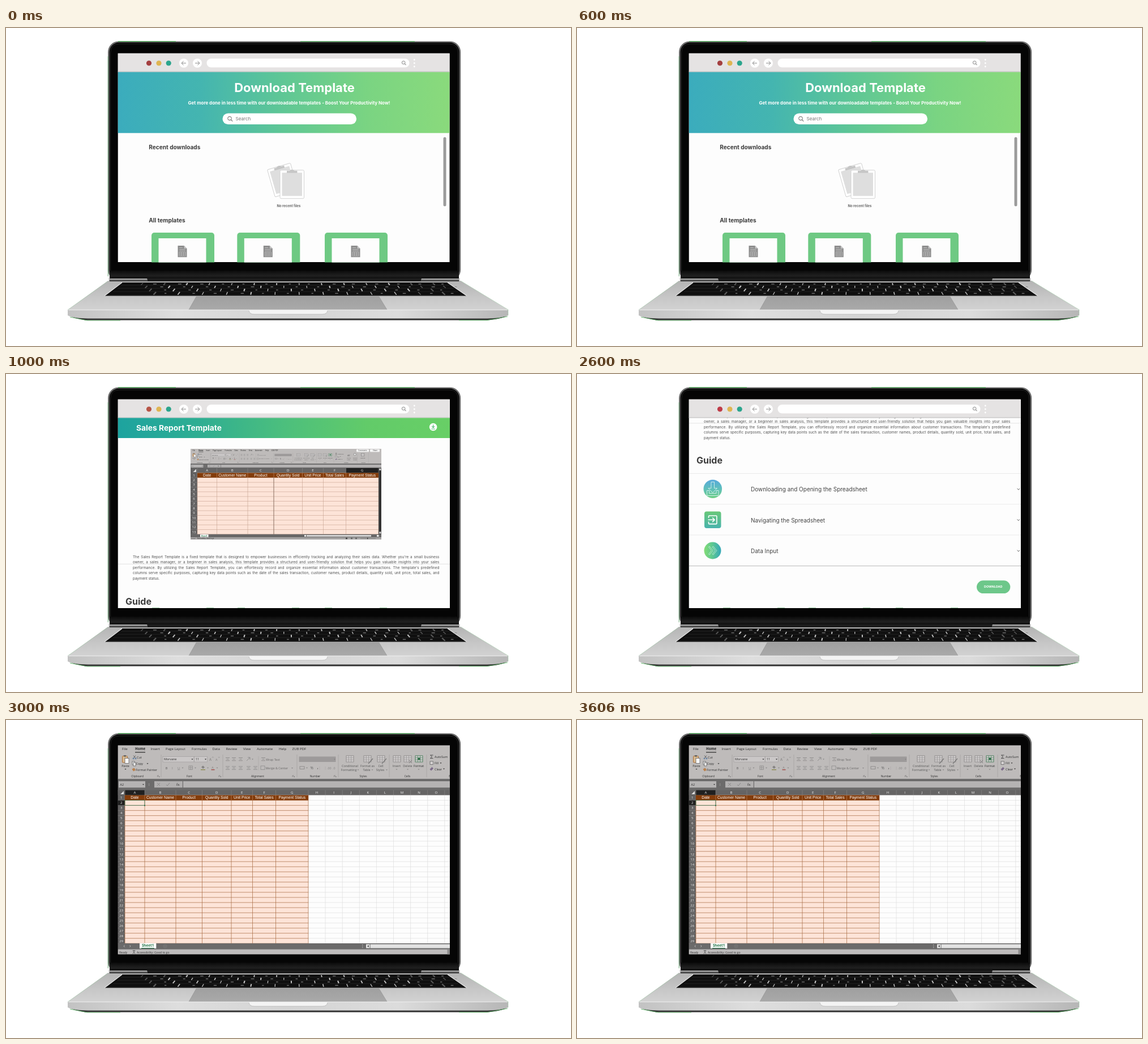
Recreate the animation shown at these times as an HTML page. Size 998 px wide and 561 px high, loop 4010 ms.

```html
<!DOCTYPE html>
<html lang="en">
<head>
<meta charset="utf-8">
<title>Template download</title>
<style>
html, body { margin: 0; width: 100%; height: 100%; overflow: hidden; background: #fff; }
svg { display: block; width: 100%; height: 100%; }
.para { font: 6.3px/9.65px Inter, sans-serif; color: #505050; }
.para div { text-align: justify; text-align-last: justify; height: 9.65px; }
.para div:last-child { text-align-last: left; }
</style>
</head>
<body>
<svg id="stage" viewBox="0 0 998 561" xmlns="http://www.w3.org/2000/svg"></svg>
<script>
const LOOP = 4010, STEP = 1000;
const INTER = 'Inter, sans-serif', UI = 'Open Sans, sans-serif', ARIAL = 'Liberation Sans, Arial, sans-serif';

// Drawing helpers: each returns a piece of SVG markup
const rect = (x, y, w, h, fill, rx = 0, more = '') =>
  `<rect x="${x}" y="${y}" width="${w}" height="${h}" rx="${rx}" fill="${fill}" ${more}/>`;
const circle = (x, y, r, fill, more = '') => `<circle cx="${x}" cy="${y}" r="${r}" fill="${fill}" ${more}/>`;
const shape = (d, fill, more = '') => `<path d="${d}" fill="${fill}" ${more}/>`;
const line = (d, color, w = 1, more = '') =>
  `<path d="${d}" fill="none" stroke="${color}" stroke-width="${w}" ${more}/>`;
const text = (x, y, s, size, fill, o = {}) =>
  `<text x="${x}" y="${y}" font-size="${size}" fill="${fill}" font-family="${o.font || INTER}"
    font-weight="${o.weight || 400}" text-anchor="${o.anchor || 'start'}">${s.replace(/&/g, '&amp;')}</text>`;
const group = (inner, more) => `<g ${more}>${inner}</g>`;
const range = (n, f) => Array.from({ length: n }, (_, i) => f(i)).join('');
const gradient = (id, colors, vertical) =>
  `<linearGradient id="${id}" x2="${vertical ? 0 : 1}" y2="${vertical ? 1 : 0}">${colors.map((c, i) =>
    `<stop offset="${i / (colors.length - 1)}" stop-color="${c}"/>`).join('')}</linearGradient>`;
const clip = (id, x, y, w, h) => `<clipPath id="${id}">${rect(x, y, w, h, '#000')}</clipPath>`;

function random(seed) {
  return () => (seed = (seed * 16807) % 2147483647) / 2147483647;
}

const defs = `<defs>
  ${gradient('hero', ['#3bacbd', '#44b5b0', '#5fc795', '#7ad482', '#8ada7c'])}
  ${gradient('band', ['#1da39f', '#2fae92', '#4cbf7d', '#62cb69', '#68cf66'])}
  ${gradient('chin', ['#0a0a0a', '#161616', '#202020', '#0c0c0c'], true)}
  ${gradient('deck', ['#b4b4b4', '#c6c6c6', '#d4d4d4'], true)}
  ${gradient('lip', ['#c2c2c2', '#dedede', '#d4d4d4', '#dcdcdc', '#b6b6b6'])}
  ${gradient('pad', ['#a0a0a0', '#a9a9a9'], true)}
  ${gradient('icon0', ['#58a9dc', '#5fc0bb', '#6fcf84'], true)}
  ${gradient('icon1', ['#69c878', '#48b3ad'], true)}
  ${gradient('icon2', ['#84dc76', '#5cc792', '#35a8b8'])}
  ${clip('screen', 197.5, 44.5, 586.5, 369)}
  ${clip('page', 197.5, 77.5, 586.5, 335.5)}
  ${clip('shot', 326, 132, 337, 160)}
</defs>`;

function keyboard() {
  const rnd = random(41);
  const half = y => 290 + (y - 449) * 1.28;
  let out = shape('M205 449H780L814 472.5H174Z', '#0f0f0f') +
    line('M174 472.5L205 449M780 449L814 472.5', '#e6e6e6', 1.2);
  [[450, 453.4], [454.8, 458.6], [460, 464.4], [465.8, 470.6]].forEach(([a, b], r) => {
    out += line(`M${494 - half(b) + 5} ${b + .6}H${494 + half(b) - 5}`, '#363636', .5);
    for (let i = 1; i < 15; i++) {
      const u = (i + r * .32) / 7.4 - 1;
      if (u > .96) continue;
      const x = 494 + u * half(a), x2 = 494 + u * half(b);
      out += line(`M${x} ${a}L${x2} ${b}`, Math.abs(u) < .72 ? '#c4c4c4' : '#5c5c5c', 1.2 + rnd());
      out += rect(x + 14 + rnd() * 10, (a + b) / 2 - .6, 3 + rnd() * 3, 1.1, '#8a8a8a');
    }
  });
  return out;
}

function laptop() {
  return rect(180, 23.4, 623.2, 422, '#6c6c6c', 19) +
    rect(182.6, 25.6, 618, 419, '#050505', 17) +
    line('M184.5 430V44Q184.5 28 200 28H783Q798.5 28 798.5 44V430', '#242424', 1) +
    rect(183, 428, 617, 14, 'url(#chin)') +
    line('M180.3 50V438', '#3f8a4d', .8) + line('M198 23.6H300M520 23.8H722', '#2fb23f', .9) +
    shape('M180 446H803L887 497V502H109V497Z', 'url(#deck)') +
    rect(183, 441.5, 617, 5.5, '#1c1c1c') +
    shape('M181 442H249L250 444.2H182ZM734 442H802L801 444.2H733Z', '#b0b0b0') +
    line('M182 445.6H250M733 445.6H801', '#6a6a6a', 1.4) +
    keyboard() +
    shape('M336 474H659L673 497H323Z', 'url(#pad)') +
    line('M323 497L336 474H659L673 497', '#8d8d8d', .6) +
    shape('M109 504Q112 511 140 515.5H850Q880 513 886.5 506Z', '#343434') +
    shape('M109 497H887V507Q876 512 850 512.5H145Q118 512 109 507Z', 'url(#lip)') +
    line('M110 497.3H886', '#f0f0f0', 1) +
    shape('M428.5 498H568.5Q567 505 559 505H438Q430 505 428.5 498Z', '#f4f4f4') +
    line('M429 498.5Q430 505 438 505H559Q567 505 568 498.5', '#b4b4b4', .8) +
    line('M113 510L144 516H202M800 515.6H850L886 509', '#4fae5a', .8) +
    line('M109.5 497L180 447M803 446L887 497V507', '#9bc9a0', .5);
}

function lens(x, y, r, color) {
  return circle(x, y, r, 'none', `stroke="${color}"`) + line(`M${x + r * .7} ${y + r * .7}l${r * .85} ${r * .85}`, color, 1.1);
}

function browserBar(red) {
  const arrow = (x, s) => circle(x, 62, 8, '#fff') +
    line(`M${x - 4} 62H${x + 4}M${x + .5 * s} 58.5L${x + 4 * s} 62L${x + .5 * s} 65.5`, '#8a8a8a', 1);
  return rect(197.5, 44.5, 586, 33, '#e5e3e3') + rect(197.5, 76.3, 586, 1.2, '#c6c6c6') +
    circle(252.5, 62, 4.6, red) + circle(270, 62, 4.6, '#dfb552') + circle(287.2, 62, 4.6, '#2ba58d') +
    arrow(314, -1) + arrow(338, 1) + rect(354.5, 54, 358, 15.6, '#fff', 7.8) +
    lens(702.2, 61, 2.8, '#8a8a8a') +
    [56, 62, 68].map(y => circle(721.3, y, 1.4, '#fff')).join('');
}

function clipboard() {
  const board = rect(0, 0, 42.5, 50, '#fff', 2, 'stroke="#d2d2d2"') + rect(3.5, 4.5, 35.5, 41, '#dedede') +
    shape('M12 5V1H17Q21 -3 25.5 1H30.5V5Z', '#c6c6c6');
  return group(board, 'transform="translate(461.5 250) rotate(-16)"') + group(board, 'transform="translate(484 250.8)"');
}

function card(x) {
  return rect(x, 361, 111, 60, '#6ec983', 5) + rect(x + 12.5, 371, 84, 50, '#fdfdfd') +
    shape(`M${x + 46.5} 384h11l5 5v15.3h-16z`, '#8d8d8d') + shape(`M${x + 57.5} 384v5h5z`, '#c4c4c4') +
    line(`M${x + 49} 387.5h6M${x + 49} 390.5h11M${x + 49} 393h11`, '#c8c8c8', .8) +
    rect(x + 49, 395.5, 11, 6.5, 'none', 0, 'stroke="#cfcfcf" stroke-width=".6"') +
    line(`M${x + 49} 398.7h11M${x + 52.6} 395.5v6.5M${x + 56.3} 395.5v6.5`, '#cfcfcf', .6);
}

function home() {
  const bold = { weight: 700 }, mid = { weight: 700, anchor: 'middle' };
  return rect(197.5, 44.5, 586, 368.5, '#fdfdfd') + rect(197.5, 77, 586, 108.3, 'url(#hero)') + browserBar('#a43f40') +
    text(509.5, 113, 'Download Template', 22, '#fff', mid) +
    text(500, 134.5, 'Get more done in less time with our downloadable templates - Boost Your Productivity Now!', 8, '#fff', mid) +
    rect(382.5, 150.5, 236.5, 19.6, '#fff', 9.8) + lens(395, 159.4, 3.3, '#666') +
    text(405.5, 163, 'Search', 8.1, '#757575') +
    text(252.3, 213.5, 'Recent downloads', 10.1, '#3c3c3c', bold) + clipboard() +
    text(499.5, 315.5, 'No recent files', 5.9, '#666', mid) +
    text(252.3, 342.8, 'All templates', 10.1, '#3c3c3c', bold) +
    [257, 408.3, 563].map(card).join('') + rect(772.5, 192.5, 5, 122, '#9b9b9b', 2.5);
}

// Office-style toolbar, also used at a reduced scale in the preview
function ribbon() {
  const dark = '#2d2d2d', grey = '#858383', ui = { font: UI }, mid = { font: UI, anchor: 'middle' };
  const label = (x, y, s, c = dark) => text(x, y, s, 5.4, c, ui);
  const center = (x, y, s, c = dark) => text(x, y, s, 5.4, c, mid);
  const tabs = [[205, 'File'], [228, 'Home'], [255.5, 'Insert'], [282, 'Page Layout'], [328, 'Formulas'], [364.5, 'Data'],
    [388.5, 'Review'], [419, 'View'], [443, 'Automate'], [482, 'Help'], [505.5, 'ZUB PDF']];
  const groups = [[232, 'Clipboard'], [324, 'Font'], [444.5, 'Alignment'], [546, 'Number'], [631, 'Styles'], [709, 'Cells'], [790, 'Editing'], [855, 'Add-ins']];
  const bars = (x, y) => line(`M${x} ${y}h7M${x + 1.5} ${y + 2.6}h4M${x} ${y + 5.2}h7`, grey, .8);
  const table = (x, c = grey) => rect(x, 63, 13, 11, '#d0cdcd', 0, `stroke="${c}" stroke-width=".8"`) +
    line(`M${x} 66.7h13M${x} 70.3h13M${x + 4.3} 63v11M${x + 8.6} 63v11`, c, .6);
  const arrow = (x, y, c = grey) => shape(`M${x} ${y}h3l-1.5 1.8z`, c);
  return rect(197.5, 44.5, 730, 60, '#bebbba') +
    tabs.map(([x, s]) => text(x, 53.3, s, 6.1, '#262626', { font: UI, weight: s === 'Home' ? 700 : 400 })).join('') +
    rect(228, 56.3, 18, 1.3, '#333') +
    groups.map(([x, s]) => text(x, 101, s, 4.8, dark, mid)).join('') +
    line('M274 61V101M383 61V101M514 61V101M587 61V101M677 61V101M743 61V101M832 61V101M875 61V101', '#a5a2a2', .8) +
    rect(205.5, 63.5, 9, 11.5, '#d8b98e', 1, 'stroke="#a9672f" stroke-width=".9"') + rect(210, 67.5, 7, 9, '#f7f7f7', 0, 'stroke="#555" stroke-width=".7"') +
    rect(208, 62.3, 4, 2.2, '#555') + center(211, 82.8, 'Paste') + arrow(209.5, 86, dark) +
    line('M225 62.5l4 5M229 62.5l-4 5', '#555', .8) + circle(225, 68, 1, 'none', 'stroke="#36689c" stroke-width=".7"') + circle(229, 68, 1, 'none', 'stroke="#36689c" stroke-width=".7"') +
    label(231, 67.5, 'Cut') + rect(223, 73, 4, 6, '#eee', 0, 'stroke="#555" stroke-width=".7"') + rect(225, 75, 4, 6, '#eee', 0, 'stroke="#555" stroke-width=".7"') +
    label(229.5, 79, 'Copy') + arrow(248.5, 76.2, dark) + shape('M222.5 86.5l4-2 2.5 4-4 2z', '#b9814d') + label(229.3, 90, 'Format Painter') +
    rect(277, 64.5, 55, 9.5, '#cac7c7', 0, 'stroke="#9b9898" stroke-width=".6"') + rect(332.5, 64.5, 23, 9.5, '#cac7c7', 0, 'stroke="#9b9898" stroke-width=".6"') +
    label(279, 71.3, 'Morvane') + label(335, 71.3, '11') + arrow(327.5, 68.6, dark) + arrow(351, 68.6, dark) +
    text(359, 71.5, 'A', 6.5, grey, ui) + text(370, 71.5, 'A', 5.6, grey, ui) + line('M364 66.5l1.3-1.6 1.3 1.6M375 65l1.3 1.6 1.3-1.6', grey, .6) +
    text(281.5, 86.5, 'B', 6, grey, { font: UI, weight: 700 }) + text(293, 86.5, 'I', 6, grey, ui) + text(303, 86.5, 'U', 6, grey, ui) + line('M303 87.8h4.4', grey, .6) + arrow(310.5, 83.8) +
    rect(323, 81, 6.5, 6.5, 'none', 0, `stroke="${grey}" stroke-width=".7"`) + line('M326.2 81v6.5M323 84.2h6.5', grey, .6) + arrow(333, 83.8) +
    shape('M345 83l3-2.5 3 3-3 2.5z', grey) + rect(344, 87, 8, 1.4, '#8d8b4f') + arrow(355, 83.8) + text(363, 86.3, 'A', 6, grey, ui) + rect(362.5, 87, 6, 1.4, '#a24b46') + arrow(371.5, 83.8) +
    [388, 399, 411].map(x => bars(x, 66.5) + bars(x, 82)).join('') + line('M425 72l6-6M427 66h4v4', grey, .8) + arrow(434, 68.5) +
    bars(425, 82) + bars(437, 82) + line('M446 64V89', '#a9a6a6', .6) + bars(451, 66.5) + label(459, 71.5, 'Wrap Text', '#6b6969') +
    rect(450, 81, 7, 6.5, 'none', 0, `stroke="${grey}" stroke-width=".7"`) + label(458.5, 86.5, 'Merge & Center', '#6b6969') + arrow(504, 84) +
    rect(517.5, 64.5, 65, 9.5, '#9d9a9a') + arrow(579, 68.6) + rect(519, 82, 8, 4.5, 'none', 0, `stroke="${grey}" stroke-width=".8"`) + arrow(530, 83.8) +
    text(537.5, 87, '%', 6.5, '#666', ui) + text(549.5, 86, ',', 9, '#555', ui) + line('M554 82V88M564 82V88', '#a5a2a2', .5) + label(567, 87, '.00', grey) + label(577, 87, '.0', grey) +
    table(601) + table(632) + table(656) + line('M640 77l8-9M664 77l8-9', '#777', 1.2) +
    center(607.5, 82.8, 'Conditional', '#555') + center(605.5, 90, 'Formatting', '#555') + center(638.5, 82.8, 'Format as', '#555') + center(637, 90, 'Table', '#555') +
    center(662, 82.8, 'Cell', '#555') + center(661, 90, 'Styles', '#555') + [620.5, 645.5, 671].map(x => arrow(x, 87.2)).join('') +
    table(684) + table(703) + table(723, '#32704a') + rect(727.3, 66.7, 4.3, 3.6, '#32704a') + line('M712 71l5 5M717 71l-5 5', '#777', .9) +
    center(690, 82.8, 'Insert', '#555') + center(709.5, 82.8, 'Delete', '#555') + center(729, 82.8, 'Format') + [688.5, 708, 727.5].map(x => arrow(x, 86.5)).join('') +
    line('M754.5 62h-5l3 2.8-3 2.8h5', dark, .8) + label(757, 67.3, 'AutoSum') + rect(749, 73, 5.5, 5.5, '#d5d2d2', 0, 'stroke="#555" stroke-width=".7"') + label(757, 78, 'Fill') + arrow(766.5, 75.2, dark) +
    shape('M748.5 87l4-4 2.5 2.5-4 4z', '#7d6b8a') + label(757, 88.5, 'Clear') + arrow(772, 85.5, dark) +
    text(795, 74, 'AZ', 8, '#555', ui) + center(800, 82.8, 'Sort &') + center(800, 90, 'Filter') + circle(823, 67, 4.5, '#e2e2e2', 'stroke="#555"') + center(824, 82.8, 'Find &') + center(824, 90, 'Select') +
    rect(847, 63, 12, 11, '#c9c6c6', 0, 'stroke="#666"') + center(853, 82.8, 'Add-ins') +
    [270, 378.5, 508.5, 582].map(x => line(`M${x} 98h-2.5v2.5M${x - 1} 99l2 2v-2`, '#666', .6)).join('') +
    rect(197.5, 103.8, 730, 22, '#6c6b6b') + rect(199, 108, 47, 11.2, '#b5b3b3') + rect(262, 108, 49.8, 11.2, '#b2b0b0') + rect(313, 108, 614, 11.2, '#b5b3b3') +
    label(201.5, 115.5, 'A2') + arrow(241, 113, dark) + text(252, 116, '⁝', 6, '#eee', ui) +
    line('M267 111l5 5M272 111l-5 5M283 114l2 2 4-5', '#868484', .9) + text(301, 116, 'fx', 6.5, '#222', { font: 'Liberation Serif, serif' });
}

const HEADS = ['Date', 'Customer Name', 'Product', 'Quantity Sold', 'Unit Price', 'Total Sales', 'Payment Status'];

// Worksheet grid: cols are column edges, the first seven columns are filled
function grid({ left, cols, top, headH, rowH, rows, ink, weight, active, activeRow, size }) {
  const right = cols[cols.length - 1], y0 = top + headH, bottom = y0 + rows * rowH, edge = cols[7];
  const mid = { font: UI, anchor: 'middle' };
  let out = rect(left, top, right - left, headH, '#656464') + rect(left, top, cols[0] - left, bottom - top, '#626161') +
    rect(edge, y0, right - edge, bottom - y0, '#fdfdfd') + rect(cols[0], y0, edge - cols[0], bottom - y0, '#fde4d8') +
    rect(cols[active], top, cols[active + 1] - cols[active], headH, '#202020') +
    shape(`M${cols[0] - 2} ${top + 1.5}v${headH - 3}h${3 - headH}z`, '#dedede');
  if (activeRow) out += rect(left, y0 + (activeRow - 1) * rowH, cols[0] - left, rowH, '#202020');
  out += range(rows, n => {
    const y = y0 + (n + 1) * rowH;
    return line(`M${left} ${y}H${cols[0]}`, '#8b8a8a', .5) + line(`M${cols[0]} ${y}H${edge}`, ink, weight) +
      line(`M${edge} ${y}H${right}`, '#d8d8d8', .6) +
      text((left + cols[0]) / 2, y - rowH / 2 + size * .36, String(n + 1), size, '#efefef', mid);
  });
  cols.forEach((x, i) => {
    out += line(`M${x} ${top}V${y0}`, '#908f8f', .5) + line(`M${x} ${y0}V${bottom}`, i < 8 ? ink : '#d8d8d8', i < 8 ? weight : .6);
    if (i < cols.length - 1 && cols[i + 1] - x > 15)
      out += text((x + cols[i + 1]) / 2, top + headH / 2 + size * .36, String.fromCharCode(65 + i), size, '#f2f2f2', mid);
  });
  out += rect(cols[0], y0, edge - cols[0], rowH, '#833c0b');
  HEADS.forEach((s, i) => {
    if (i) out += line(`M${cols[i]} ${y0}v${rowH}`, '#c48d6c', .6);
    out += text((cols[i] + cols[i + 1]) / 2, y0 + rowH / 2 + 2.3, s, 6.75, '#fff', { font: ARIAL, anchor: 'middle' });
  });
  return out;
}

function preview() {
  const mid = { font: UI, anchor: 'middle' };
  return group(
    rect(326, 132, 337, 160, '#696868') +
    group(ribbon(), 'transform="translate(326 132) scale(.464 .44) translate(-197.5 -44.5)"') +
    rect(619, 132.8, 22, 4.8, '#f5f5f5', 1) + text(630, 136.4, 'Comments', 3, '#333', mid) +
    rect(643, 132.8, 17, 4.8, '#f5f5f5', 1) + text(652, 136.4, 'Share', 3, '#333', mid) +
    grid({ left: 326, cols: [338, 372.5, 427, 473, 523.5, 560.5, 600.5, 658], top: 166, headH: 8.5, rowH: 8.33, rows: 13,
      ink: '#c09a88', weight: .55, active: 6, size: 6 }) +
    line('M473 182V283', '#7a6258', .7) + rect(658, 166, 5, 117, '#4a4949') +
    rect(659.8, 171, 2.4, 106, '#2c2c2c') + rect(659.3, 166.8, 3, 3, '#ddd') + rect(659.3, 278.5, 3, 3, '#ddd') +
    rect(326, 282.8, 337, 5.2, '#686767') + rect(343, 283, 14.5, 4.6, '#fff') + text(350.2, 286.6, 'Sheet1', 3.2, '#217346', { font: UI, weight: 700, anchor: 'middle' }) +
    rect(527, 284, 3, 3, '#eee') + rect(531, 284.2, 114, 2.6, '#e4e4e4') + rect(655, 284, 3.5, 3, '#eee') +
    rect(326, 288, 337, 4, '#a5a3a3') + text(327.5, 291, 'Ready', 2.5, '#333', { font: UI }) + text(338, 291, 'Accessibility: Good to go', 2.6, '#333', { font: UI }) +
    rect(600, 288.8, 3, 2.4, '#444') + rect(609, 288.8, 3, 2.4, '#666') + rect(617, 288.8, 3, 2.4, '#666') + line('M626 290H653', '#666', .6) + rect(638, 288.8, 1.2, 2.4, '#333'),
    'clip-path="url(#shot)"');
}

const PARA = [
  "The Sales Report Template is a fixed template that is designed to empower businesses in efficiently tracking and analyzing their sales data. Whether you're a small business",
  'owner, a sales manager, or a beginner in sales analysis, this template provides a structured and user-friendly solution that helps you gain valuable insights into your sales',
  "performance. By utilizing the Sales Report Template, you can effortlessly record and organize essential information about customer transactions. The template's predefined",
  'columns serve specific purposes, capturing key data points such as the date of the sales transaction, customer names, product details, quantity sold, unit price, total sales, and',
  'payment status.'
];

const SCROLL = 248.5;

function guide() {
  const items = ['Downloading and Opening the Spreadsheet', 'Navigating the Spreadsheet', 'Data Input'];
  const thin = '#d9f1ee';
  return text(211, 158.3, 'Guide', 16, '#3c3c3c', { weight: 700 }) +
    line('M198 175.5H784M198 229.8H784M198 284H784', '#e6e6e6', .8) + line('M198 338.6H784', '#b9b9b9', 1) +
    items.map((s, i) => {
      const y = 203.3 + i * 54.4;
      return text(307, y + 4, s, 10, '#444') + line(`M777.5 ${y - 1.3}l2.3 2.2 2.3-2.2`, '#555', 1);
    }).join('') +
    circle(239.8, 202.8, 16.3, 'url(#icon0)') +
    line('M237 190.5h5.5v11h5l-7.8 8-7.8-8h5zM229.5 205.5h4v5h12.5v-5h4v9h-20.5z', thin, .9) +
    rect(225, 242.5, 29.5, 29.5, 'url(#icon1)', 4) +
    line('M232.5 254v-2.8q0-1.2 1.2-1.2h12q1.2 0 1.2 1.2v12.2q0 1.2-1.2 1.2h-12q-1.2 0-1.2-1.2v-2.8M231.5 257.3h11M239.2 253.5l3.8 3.8-3.8 3.8', '#fff', 1.6) +
    circle(239.5, 311.5, 15, 'url(#icon2)') +
    [232.5, 239].map(x => line(`M${x} 305.2l1.6-1.2 6.2 7.5-6.2 7.5-1.6-1.2 5-6.3z`, '#c9efdd', .8)).join('') +
    rect(706, 364.3, 59.3, 22.8, '#6dc78a', 11.4) +
    text(735.3, 377.2, 'DOWNLOAD', 5.4, '#fff', { weight: 700, anchor: 'middle' });
}

function templatePage(scroll, red) {
  const slivers = [258, 354, 409, 505, 563, 660].map(x => rect(x, 412.2, 13, .8, '#8fcb9c')).join('');
  const body = rect(197.5, 77, 586.5, 36, 'url(#band)') +
    text(230, 99.8, 'Sales Report Template', 13.8, '#fff', { weight: 700 }) +
    circle(754.6, 93.5, 6.8, '#fff') + line('M754.6 89.3v5M752.2 92.3l2.4 2.4 2.4-2.4M751.3 97h6.6', '#52bd73', 1.2) +
    preview() + line('M198 335.3H784', '#dedede', .8) +
    `<foreignObject x="224" y="318.5" width="541.3" height="52"><div class="para">${PARA.map(s => `<div>${s}</div>`).join('')}</div></foreignObject>` +
    group(guide(), `transform="translate(0 ${SCROLL})"`);
  return rect(197.5, 44.5, 586.5, 368.5, '#fdfdfd') + browserBar(red) +
    group(group(body, `transform="translate(0 ${-scroll})"`), 'clip-path="url(#page)"') + slivers;
}

function workbook() {
  const cols = [210, 245, 300, 346.5, 398, 435.5, 476.5, 534];
  for (let i = 1; i < 9; i++) cols.push(534 + i * 30.1);
  cols.push(784);
  return rect(197.5, 44.5, 586.5, 369, '#6b6a6a') + ribbon() +
    grid({ left: 197.5, cols, top: 123.8, headH: 8.8, rowH: 9.02, rows: 29, ink: '#a5683f', weight: .7, active: 0, activeRow: 2, size: 6.1 }) +
    rect(210, 141.6, 35, 9, 'none', 0, 'stroke="#2b7350" stroke-width=".7"') + rect(244, 149.8, 2, 2, '#2b7350') +
    rect(197.5, 394, 586.5, 10.4, '#6b6a6a') + line('M209.5 397.3l-1.5 1.7 1.5 1.7M218.5 397.3l1.5 1.7-1.5 1.7', '#d0d0d0', .8) +
    rect(236, 393.6, 29.3, 9.4, '#fff') + text(250.6, 400.4, 'Sheet1', 6.3, '#217346', { font: UI, weight: 700, anchor: 'middle' }) + rect(239, 402, 23, 1, '#217346') +
    circle(281, 399, 3, 'none', 'stroke="#7d7c7c" stroke-width=".7"') + line('M281 397.4v3.2M279.4 399h3.2', '#7d7c7c', .7) +
    [396.5, 399, 401.5].map(y => circle(629.8, y, .6, '#eee')).join('') +
    rect(636, 395.5, 6.6, 7, '#e4e4e4') + shape('M640.6 397v4l-2.4-2z', '#333') + rect(643.5, 395.5, 140.5, 7, '#e2e2e2') +
    rect(197.5, 404.6, 586.5, 9, '#bebcbc') + rect(779.5, 404.6, 4.5, 9, '#8b8a8a') +
    text(200, 411.5, 'Ready', 5, '#333', { font: UI }) + text(231, 411.5, 'Accessibility: Good to go', 5.1, '#333', { font: UI }) +
    line('M223.5 407h5M226 406v3.5l-2 3M226 409.5l2 3', '#444', .8);
}

const stage = document.getElementById('stage');
const views = [home(), templatePage(0, '#b75546'), templatePage(SCROLL, '#bf3c48'), workbook()];
stage.innerHTML = defs + laptop() +
  views.map(v => group(v, 'class="view" clip-path="url(#screen)"')).join('');
const layers = [...stage.querySelectorAll('.view')];
const start = performance.now();

function draw(time) {
  const current = Math.min(layers.length - 1, Math.floor((time % LOOP) / STEP));
  layers.forEach((layer, i) => layer.setAttribute('display', i === current ? 'inline' : 'none'));
}

function tick() {
  draw(performance.now() - start);
  requestAnimationFrame(tick);
}
tick();
</script>
</body>
</html>
```
